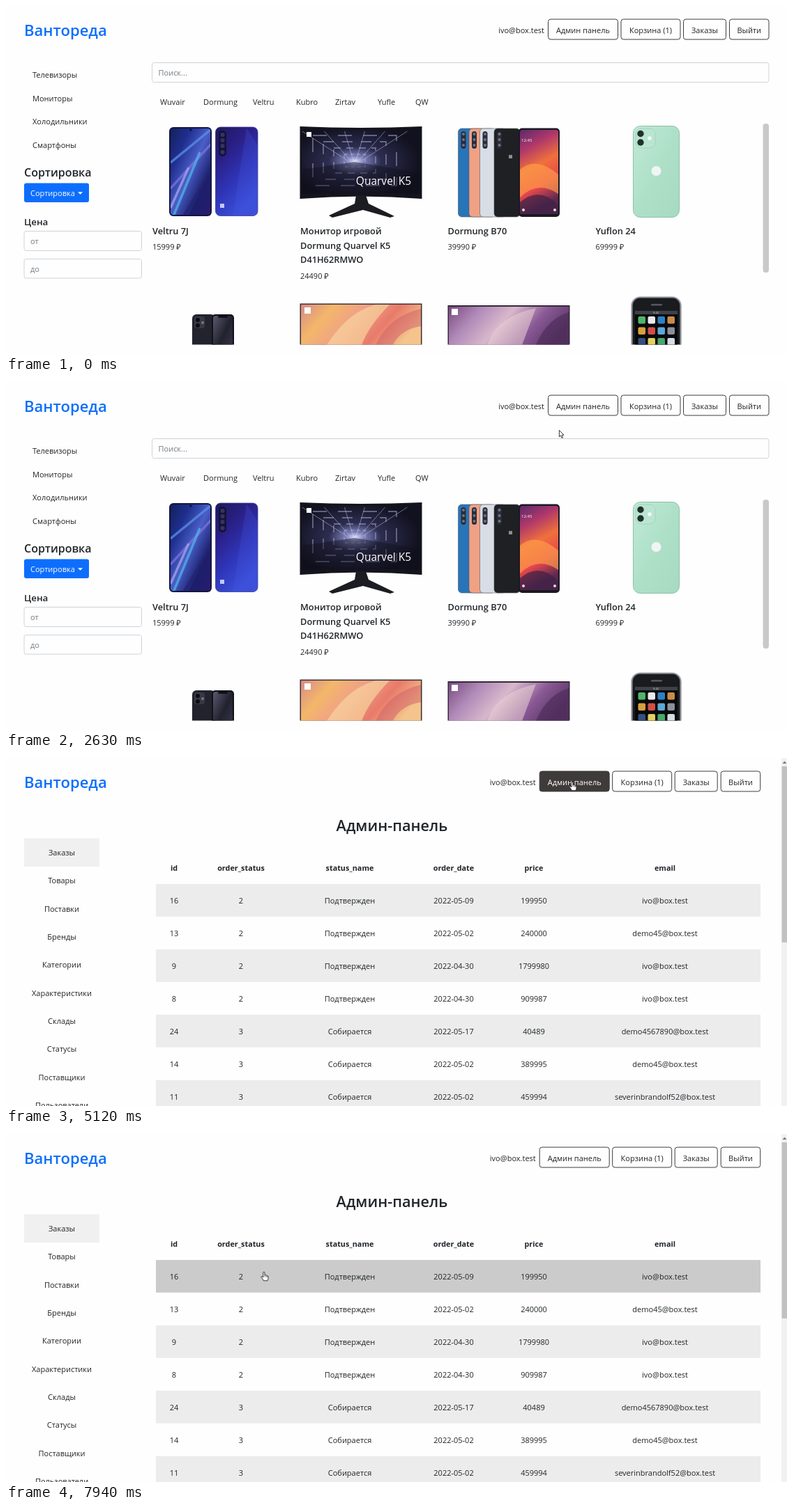
Write an HTML page that moves like this. It is 1120 px wide and 500 px high and loops after 8000 ms.

```html
<!DOCTYPE html>
<html lang="ru">
<head>
<meta charset="utf-8">
<title>Магазин</title>
<style>
html, body { margin: 0; width: 100%; height: 100%; overflow: hidden; background: #fefefe; }
svg { display: block; width: 1120px; height: 500px; }
text { font: 11px "Open Sans", "Noto Sans", sans-serif; fill: #212529; white-space: pre; }
</style>
</head>
<body>
<svg id="stage" viewBox="0 0 1120 500"></svg>
<script>
const LOOP = 8000, PAGE_SWITCH = 5120, ROW_HOVER = 7130;
const BLUE = '#0d6efd', INK = '#212529';

const rect = (x, y, w, h, fill, r = 0, more = '') =>
  `<rect x="${x}" y="${y}" width="${w}" height="${h}" rx="${r}" fill="${fill}" ${more}/>`;
const circle = (x, y, r, fill, more = '') =>
  `<circle cx="${x}" cy="${y}" r="${r}" fill="${fill}" ${more}/>`;
const path = (d, fill, more = '') => `<path d="${d}" fill="${fill}" ${more}/>`;
const text = (x, y, s, { size = 11, weight = 400, fill = INK, anchor = 'start', id = '' } = {}) =>
  `<text ${id && `id="${id}"`} x="${x}" y="${y}" text-anchor="${anchor}"
    style="font-size:${size}px;font-weight:${weight};fill:${fill}">${s}</text>`;
const mid = (x, y, s, o) => text(x, y, s, { ...o, anchor: 'middle' });
const grad = (id, x2, y2, ...colors) =>
  `<linearGradient id="${id}" x2="${x2}" y2="${y2}">${colors.map((c, i) =>
    `<stop offset="${i / (colors.length - 1)}" stop-color="${c}"/>`).join('')}</linearGradient>`;
const each = (list, fn) => list.map(fn).join('');

const defs = `<defs>
  ${grad('front', 1, 1, '#15205e', '#1f2f8f', '#4a5fc8', '#1b1f6b', '#2a1a6e')}
  ${grad('back', .5, 1, '#1d1a5a', '#2a1f86', '#2f35b8', '#3a4fd8')}
  ${grad('sunset', .25, 1, '#5a2a6e', '#b0386a', '#f0703c', '#e8484c', '#5a2750')}
  ${grad('mint', 1, 1, '#c0ead6', '#aee0c8', '#a6dac1')}
  ${grad('warm', 1, .35, '#d98a86', '#f3b76a', '#f0a088', '#e87a6a', '#f4c48c')}
  ${grad('violet', 1, .35, '#7a4a80', '#b08ab8', '#d8b8cc', '#8a5a96', '#5d3768')}
  ${grad('night', 1, 1, '#5b5870', '#22222e', '#3c3a52')}
  <radialGradient id="tunnel" cx=".45" cy=".5" r=".55">
    <stop offset="0" stop-color="#dfe2ff"/><stop offset=".14" stop-color="#7d80b8"/>
    <stop offset=".4" stop-color="#2d2d50"/><stop offset="1" stop-color="#11111f"/>
  </radialGradient>
  <clipPath id="list"><rect x="205" y="165" width="875" height="321.5"/></clipPath>
  <clipPath id="face"><rect x="236" y="176" width="57" height="124" rx="4"/></clipPath>
</defs>`;

const button = (x, w, s, id = '') =>
  rect(x + .5, 19, w - 1, 29, '#fefefe', 3.5, `stroke="#3f3b3b" ${id && `id="${id}"`}`) +
  mid(x + w / 2, 38.5, s, { id: id && id + 'Text' });
const field = (x, y, w, h, s) =>
  rect(x + .5, y + .5, w - 1, h - 1, '#fefefe', 3, 'stroke="#ced4da"') +
  text(x + 9.5, y + 19, s, { fill: '#757c83' });

const header = text(26, 43, 'Вантореда', { size: 22, weight: 600, fill: BLUE }) + `<g id="nav">
  ${text(772, 38.5, 'ivo@box.test', { anchor: 'end' })}
  ${button(777, 101, 'Админ панель', 'adminBtn')}
  ${button(881.5, 86, 'Корзина (1)')}${button(971, 62, 'Заказы')}${button(1037, 57.5, 'Выйти')}
</g>`;

function twoPhones() {
  const streak = (d, c) => path(d, 'none', `stroke="${c}" stroke-width="3.5" opacity=".75"`);
  return rect(234, 174, 61, 128, '#14163f', 6) + rect(236, 176, 57, 124, 'url(#front)', 4) +
    `<g clip-path="url(#face)">${streak('M236 225L293 178', '#5b8fe8')}${streak('M236 262L296 196', '#7f70dc')}
      ${streak('M240 302L278 210', '#4fb4e8')}${streak('M255 302L297 230', '#262270')}${streak('M236 290L262 232', '#a9a4ea')}</g>` +
    circle(265, 178, 1.6, '#0c0d28') +
    rect(300.5, 174, 60.5, 127.5, 'url(#back)', 7, 'stroke="#3b3a8c" stroke-width=".8"') +
    path('M345 175L361 200V300L325 301Z', '#4355e0', 'opacity=".25"') +
    rect(305, 179, 11, 37, '#15133d', 5) + each([185, 193, 201, 210], y => circle(310.5, y, 3, '#36345f')) +
    rect(307, 284, 6, 6, '#c3c8f4');
}

function monitor() {
  const rays = each([-52, -30, -10, 10, 30, 52], d =>
    path(`M${500 + d / 5} 222L${500 + d * 1.45} ${d % 20 ? 180 : 266}`, 'none', 'stroke="#c9ccf2" stroke-width="1" opacity=".5"'));
  const frames = each([1, 2, 3, 4], k => rect(500 - k * 15, 222 - k * 9, k * 30, k * 18, 'none', 0,
    `stroke="#aeb2dc" stroke-width="1.4" stroke-dasharray="${k * 5} ${k * 4}" opacity=".65"`));
  return path('M421.5 173Q509 177 596.5 173V277Q509 270 421.5 277Z', '#14141c') +
    path('M424 176Q509 180 594 176V270Q509 267 424 270Z', 'url(#tunnel)') + rays + frames +
    path('M424 235L500 224L594 240V270Q509 267 424 270Z', '#10101c', 'opacity=".45"') +
    path('M502 272H516L520 284L557 302L551 304L512 293L468 304L463 301L500 284Z', '#1c1d22') +
    rect(431, 181, 7, 7, '#fff') +
    mid(541.5, 257, 'Quarvel K5', { size: 15.5, fill: '#fff' });
}

function fivePhones() {
  const backs = [[648.5, '#2874b8'], [664, '#f0a184'], [679.5, '#d9dde6'], [700, '#1e2023']];
  return each(backs, ([x, c]) => rect(x, 176, 37, 127, c, 5, 'stroke="#55585e" stroke-width=".6"') +
      rect(x + 4, 180, 7, 25, '#2a2c38', 3.5) + each([184, 192, 200], y => circle(x + 7.5, y, 2, '#71758a'))) +
    rect(721, 214, 5, 5, '#8b8d91') +
    rect(735, 175.5, 59, 127.5, '#1a1820', 5) + rect(737, 178, 55, 121, 'url(#sunset)', 3.5) +
    path('M737 235Q760 215 792 242V270Q762 250 737 275Z', '#ffa04a', 'opacity=".65"') +
    path('M737 282Q765 258 792 286V299H737Z', '#3c2146', 'opacity=".7"') +
    text(739, 195, '12:45', { size: 6, fill: '#fff' }) +
    each([742, 787], x => circle(x, 293, 2, '#f0d8e0'));
}

const mintPhone = () =>
  rect(899.5, 172.5, 66, 131, 'url(#mint)', 10, 'stroke="#8fbfa9"') +
  rect(903, 176, 28, 28, '#b9e5d1', 8, 'stroke="#9ccdb7" stroke-width=".7"') +
  circle(910, 183.5, 4.7, '#20302c') + circle(910, 196, 4.7, '#20302c') +
  circle(923, 190, 2.7, '#f2fff9') + circle(932.5, 237, 7, '#f1f5f4');

function secondRow() {
  const icons = ['#4fb46a', '#e9e9ee', '#2e7fc4', '#c98c48', '#d8a13d', '#d24e48', '#5ba7d8', '#8c8f98', '#35507c', '#e2cf62', '#48a86c', '#d8dce4'];
  return rect(267, 443, 33, 60, '#22232d', 6) + rect(270, 446, 15, 17, '#363844', 4) +
    circle(275, 451, 3, '#0b0c10') + circle(275, 459, 3, '#0b0c10') + circle(282, 455, 2, '#767784') +
    rect(295, 443, 32, 60, '#101116', 5) + rect(297, 445, 28, 58, 'url(#night)', 3.5) + rect(304, 445, 14, 3, '#101116', 1.5) +
    rect(421.5, 427.5, 175, 70, '#3a3034') + rect(423, 429, 172, 68, 'url(#warm)') +
    path('M460 487Q490 440 530 429H550Q520 460 510 487Z', '#f9d9a0', 'opacity=".65"') +
    path('M530 487Q550 445 595 435V460Q565 465 555 487Z', '#cf5e66', 'opacity=".5"') +
    rect(428, 433, 9, 9, '#fff') +
    rect(633.5, 430, 175, 70, '#352a3a') + rect(635, 432, 172, 68, 'url(#violet)') +
    path('M690 487Q705 445 760 434L740 487Z', '#ecd2d6', 'opacity=".55"') +
    path('M760 487Q775 450 807 440V487Z', '#4a2b58', 'opacity=".6"') +
    rect(639, 435, 9, 9, '#fff') +
    rect(897.5, 418.5, 70, 90, '#1a1b1f', 12, 'stroke="#8f9298" stroke-width="2.2"') +
    rect(902, 438, 61, 60, '#08090c') + rect(925, 428, 16, 2.4, '#55585e', 1.2) +
    rect(902, 438, 61, 5, '#3d4149') + mid(932, 442.3, '9:42', { size: 4, fill: '#ddd' }) +
    each(icons, (c, i) => rect(906.5 + i % 4 * 14, 446 + (i >> 2) * 15.5, 10.5, 10.5, c, 2));
}

const brands = [[221, 'Wuvair'], [283, 'Dormung'], [354, 'Veltru'], [416, 'Kubro'], [472, 'Zirtav'], [533, 'Yufle'], [587, 'QW']];
const goods = [
  [210, '15999', 'Veltru 7J'],
  [422, '24490', 'Монитор игровой', 'Dormung Quarvel K5', 'D41H62RMWO'],
  [633.5, '39990', 'Dormung B70'],
  [845.5, '69999', 'Yuflon 24'],
];
const shop = field(209, 81, 885.5, 29, 'Поиск...') +
  each(brands, ([x, s]) => text(x, 142, s)) +
  each(['Телевизоры', 'Мониторы', 'Холодильники', 'Смартфоны'], (s, i) => text(38, 103 + i * 33.7, s)) +
  text(26, 245, 'Сортировка', { size: 16, weight: 600 }) +
  rect(26, 254.5, 93, 27.5, BLUE, 3) + text(35, 273, 'Сортировка', { fill: '#fff' }) +
  path('M103 267.3H110L106.500 270.800Z', '#fff') +
  text(26, 314.5, 'Цена', { size: 13.4, weight: 600 }) +
  field(25.5, 323, 169.5, 29, 'от') + field(25.5, 363, 169.5, 28.5, 'до') +
  rect(1085.5, 169, 8.5, 214, '#c9c9c9', 4) +
  each(goods, ([x, price, ...name]) =>
    each(name, (s, i) => text(x, 328 + i * 20.7, s, { size: 12.8, weight: 600 })) +
    text(x, 350 + (name.length - 1) * 21, price + ' ₽')) +
  `<g clip-path="url(#list)">${twoPhones()}${monitor()}${fivePhones()}${mintPhone()}${secondRow()}</g>`;

const columns = [241, 337, 493, 642, 757, 945];
const mail = ['ivo@box.test', 'demo45@box.test', 'demo4567890@box.test', 'severinbrandolf52@box.test'];
const ok = 'Подтвержден', packing = 'Собирается';
const orders = [
  [16, 2, ok, '2022-05-09', 199950, mail[0]],
  [13, 2, ok, '2022-05-02', 240000, mail[1]],
  [9, 2, ok, '2022-04-30', 1799980, mail[0]],
  [8, 2, ok, '2022-04-30', 909987, mail[0]],
  [24, 3, packing, '2022-05-17', 40489, mail[2]],
  [14, 3, packing, '2022-05-02', 389995, mail[1]],
  [11, 3, packing, '2022-05-02', 459994, mail[3]],
];
const menu = ['Заказы', 'Товары', 'Поставки', 'Бренды', 'Категории', 'Характеристики', 'Склады', 'Статусы', 'Поставщики', 'Пользователи'];
const cells = (row, y, o) => each(row, (s, i) => mid(columns[i], y, s, o));
const admin = mid(553.5, 105, 'Админ-панель', { size: 21.7, weight: 600 }) +
  rect(26, 115.5, 108, 40.5, '#f0f0f0') +
  each(menu, (s, i) => mid(80, 140 + i * 40.35, s)) +
  cells(['id', 'order_status', 'status_name', 'order_date', 'price', 'email'], 162, { size: 10.8, weight: 700 }) +
  each(orders, (row, i) => (i % 2 ? '' :
    rect(215, 181 + i * 46.95, 867, 46.8, '#ececec', 0, i ? '' : 'id="firstRow"')) + cells(row, 209 + i * 46.95)) +
  rect(1112, 0, 8, 500, '#f1f1f1') + rect(1112.5, 12, 7.5, 253, '#c1c1c1') +
  path('M1113.500 8L1116.500 4.500L1119.500 8Z', '#7a7a7a');

const outline = 'stroke="#222" stroke-width=".9" stroke-linejoin="round"';
const cursor = `<g id="cursor">
  <g id="arrow">${path('M.4 .4V9.8L2.500 7.800L4 11.400L5.700 10.700L4.200 7.200H7Z', '#fff', outline)}</g>
  <g id="hand">${path('M-1.200 1.200Q-1.200 .2-.1 .2Q1 .2 1 1.200V4.800Q2.600 4.100 3.100 5.200Q4.400 4.700 4.700 5.800Q6 5.500 6 7V9.500Q6 10.800 5 12.800H-.7Q-1.200 11.200-2.500 9.600L-4 7.700Q-4.300 6.400-2.900 6.600L-1.200 8Z', '#fff', outline)}
    ${path('M1 5V7.500M3.100 5.600V7.700M4.700 6.200V8', 'none', 'stroke="#222" stroke-width=".6"')}</g>
</g>`;

const $ = id => document.getElementById(id);
$('stage').innerHTML = defs + header + `<g id="shop">${shop}</g><g id="admin">${admin}</g>` + cursor;

// start, end, number of steps, waypoints of the pointer tip
const moves = [
  [0, 0, 1, null],
  [610, 743, 3, [[1050, 445], [1000, 270], [911, 91]]],
  [810, 810, 1, null],
  [1340, 1620, 5, [[842, 13], [818, 29], [797.5, 49]]],
  [1690, 1900, 4, [[796, 54], [790, 62]]],
  [2630, 3400, 12, [[793, 69], [787, 73], [806, 70], [820, 52]]],
  [3470, 3890, 7, [[817, 45], [811, 33], [805, 25]]],
  [4840, 4840, 1, [[814, 30]]],
  [5050, 5050, 1, [[812, 34]]],
  [5380, 5640, 5, [[730, 42], [540, 58], [322, 82]]],
  [6110, 6600, 8, [[318, 88], [288, 128], [254, 171]]],
  [7060, 7410, 6, [[297, 176], [356, 196]]],
  [7940, 7940, 1, [[370, 198]]],
];
const shapes = [[0, 'arrow'], [1410, 'hand'], [1620, 'arrow'], [3470, 'hand'], [5380, 'arrow'], [6390, 'hand']];
const hover = [[0, 0], [1410, .5], [1480, 1], [1690, .5], [1760, 0], [3470, .4], [3540, 1], [5380, .5], [5450, 0]];

const latest = (table, t) => table.findLast(row => row[0] <= t);

function pointer(t) {
  const [start, end, steps, points] = latest(moves, t);
  if (!points) return null;
  if (steps === 1) return points[0];
  const last = steps - 1;
  const step = Math.min(last, Math.floor((t - start) / (end - start) * last + 1e-6));
  const u = step / last * (points.length - 1);
  const i = Math.min(points.length - 2, Math.floor(u));
  return points[i].map((v, k) => v + (points[i + 1][k] - v) * (u - i));
}

const blend = (a, b, u) => `rgb(${a.map((v, i) => Math.round(v + (b[i] - v) * u))})`;
const show = (id, on) => $(id).setAttribute('display', on ? 'inline' : 'none');

function draw(t) {
  const onAdmin = t >= PAGE_SWITCH;
  show('shop', !onAdmin);
  show('admin', onAdmin);
  $('nav').setAttribute('transform', `translate(${onAdmin ? -12.3 : 0} 0)`);

  const dark = latest(hover, t)[1];
  $('adminBtn').setAttribute('fill', blend([254, 254, 254], [64, 59, 59], dark));
  $('adminBtnText').style.fill = blend([33, 37, 41], [255, 255, 255], dark);
  $('firstRow').setAttribute('fill', t >= ROW_HOVER ? '#cbcbcb' : '#ececec');

  const tip = pointer(t), shape = latest(shapes, t)[1];
  show('cursor', tip);
  show('arrow', shape === 'arrow');
  show('hand', shape === 'hand');
  if (tip) $('cursor').setAttribute('transform', `translate(${tip})`);
}

const begin = performance.now();
function tick() {
  draw((performance.now() - begin) % LOOP);
  requestAnimationFrame(tick);
}
tick();
</script>
</body>
</html>
```
